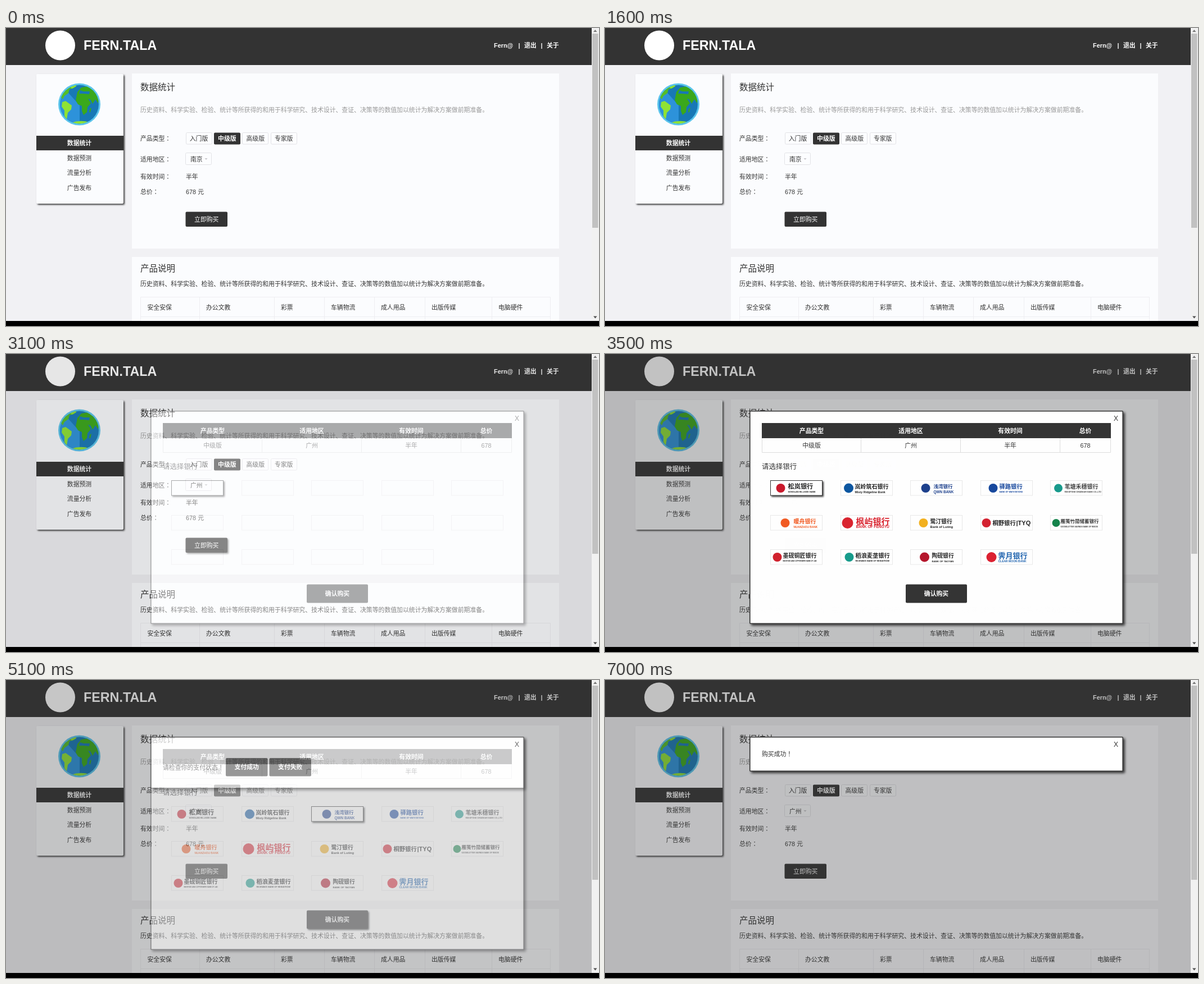
Recreate the animation shown at these times as an HTML page. Size 1055 by 531 pixels, loop 7.9 s.

```html
<!DOCTYPE html>
<html lang="zh-CN">
<head>
<meta charset="utf-8">
<title>数据统计</title>
<style>
html, body { margin: 0; width: 100%; height: 100%; overflow: hidden; background: #000; }
svg { display: block; }
text { font-family: "Liberation Sans", "Noto Sans CJK SC", "Noto Sans CJK", sans-serif; fill: #333; }
.centred { font-family: "Noto Sans CJK JP", "Noto Sans CJK", sans-serif; }
.mid { text-anchor: middle; }
.bold { font-weight: 700; }
.white { fill: #fff; }
.grey { fill: #999; }
.dark { fill: #333; }
.panel { fill: #fbfcfe; }
.line { fill: none; stroke: #eeeef2; }
.tag { fill: #fcfdff; stroke: #e2e2e6; }
.lift { filter: drop-shadow(2px 2px 1.5px rgba(0, 0, 0, .75)); }
.frame { fill: #fff; stroke: #333; stroke-width: 1.6; filter: drop-shadow(3px 3px 2px rgba(0, 0, 0, .7)); }
</style>
</head>
<body>
<svg id="stage" width="1055" height="531" viewBox="0 0 1055 531"></svg>
<script>
const BASE = 10.87;
const INTRO = '历史资料、科学实验、检验、统计等所获得的和用于科学研究、技术设计、查证、决策等的数值加以统计为解决方案做前期准备。';

// colons and exclamation marks sit in the middle of their cell
const punctuate = s => s.replace(/[：！]/g, '<tspan class="centred" lang="ja">$&</tspan>');
// y is the vertical centre of the text
const text = (s, x, y, cls = '', size = BASE, more = '') =>
  `<text x="${x}" y="${y + size * .37}" font-size="${size}" class="${cls}" ${more}>${punctuate(s)}</text>`;
const rect = (x, y, w, h, cls = '', more = '') =>
  `<rect x="${x}" y="${y}" width="${w}" height="${h}" class="${cls}" ${more}/>`;
const circle = (x, y, r, fill) => `<circle cx="${x}" cy="${y}" r="${r}" fill="${fill}"/>`;
const group = (id, body, more = '') => `<g id="${id}" ${more}>${body}</g>`;
const path = (d, fill) => `<path d="${d}" fill="${fill}"/>`;
const crisp = v => Math.floor(v) + .5;

const button = (label, x, y, w, h, cls = 'bold', id = '') =>
  rect(x, y, w, h, 'dark', `rx="2" id="${id}"`) + text(label, x + w / 2, y + h / 2, 'mid white ' + cls);

function globe() {
  return `<clipPath id="disc"><circle cx="130.5" cy="136" r="34.5"/></clipPath>` +
    circle(130.5, 136, 37.5, '#5cc5ec') + circle(130.5, 136, 34.5, '#1878b6') +
    `<g clip-path="url(#disc)">` +
    path('M94 110 L106 110 L131 138 V172 H94Z', '#2d92da') +
    path('M97 122 L101 110 L112 102 L126 100 L121 107 L113 109 L111 116 L104 121 L101 127Z', '#55bd27') +
    path('M113 103 L124 99 L125 104 L117 108Z', '#8fe235') +
    path('M100 132 L106 130 L117 138 L116 145 L110 151 L108 163 L104 157 L104 147 L99 140Z', '#8fe235') +
    path('M127 114 L134 106 L146 104 L158 110 L166 124 L164 134 L159 127 L154 135 L150 127 L146 126 L151 134 L145 141 L144 150 L138 155 L135 148 L135 139 L128 136 L124 129Z', '#3aa81b') +
    path('M132 111 L138 113 L149 113 L148 118 L138 117 L130 117Z', '#1878b6') +
    path('M149 144 L152 142 L150 150 L148 150Z', '#3aa81b') +
    path('M116 169 Q131 163 149 168 L143 172 H120Z', '#8fe235') + '</g>';
}

function header() {
  return rect(0, 0, 1042, 66, 'dark') + circle(96.5, 31, 26.5, '#fff') +
    text('FERN.TALA', 138, 30.5, 'bold white', 23.3) +
    text('Fern@', 868, 31, 'bold white') + text('|', 913, 31, 'mid bold white') +
    text('退出', 922, 31, 'bold white') + text('|', 953, 31, 'mid bold white') +
    text('关于', 962, 31, 'bold white');
}

function sidebar() {
  const items = ['数据统计', '数据预测', '流量分析', '广告发布'];
  return rect(54, 82, 155, 231, 'panel lift', 'rx="2"') + globe() + rect(54, 192, 155, 26, 'dark') +
    items.map((s, i) => text(s, 130.5, 205 + i * 26.5, i ? 'mid' : 'mid bold white')).join('');
}

function orderPanel() {
  const tags = ['入门版', '中级版', '高级版', '专家版'].map((s, i) => {
    const x = 320 + i * 50.4, on = i === 1;
    const box = on ? rect(x - .4, 186.5, 47, 21, 'dark', 'rx="2"') : rect(crisp(x), 186.5, 46, 20.5, 'tag', 'rx="2"');
    return box + text(s, x + 23, 197, on ? 'mid white bold' : 'mid');
  }).join('');
  const labels = [['产品类型：', 197], ['适用地区：', 233.5], ['有效时间：', 265], ['总价：', 291.5]];
  return rect(224, 81, 760, 312, 'panel') + text('数据统计', 239, 105, '', 15.54) +
    text(INTRO, 239, 145.5, 'grey') + labels.map(([s, y]) => text(s, 239, y)).join('') + tags +
    group('hover', rect(319.5, 186.5, 47, 21, 'dark', 'rx="2"') + text('入门版', 343, 197, 'mid white')) +
    rect(319.5, 222.5, 46, 21, 'tag', 'rx="2"') + text('南京', 328, 233.5, '', BASE, 'id="city"') +
    path('M353.5 232 h5 l-2.5 3z', '#c8c8cc') +
    text('半年', 320, 265) + text('678 元', 320, 291.5) + button('立即购买', 319.5, 327.5, 74.5, 26.5, '', 'buy');
}

function catalogue() {
  const cols = [239.5, 344, 477, 566, 655, 745, 864, 968.5];
  const rows = [
    '安全安保 办公文教 彩票 车辆物流 成人用品 出版传媒 电脑硬件',
    '电子电工 房地产建筑装修 分类平台 服装鞋帽 箱包饰品 化工原料制品 机械设备',
    '家庭日用品 家用电器 教育培训 节能环保 金融服务 礼品 旅游住宿',
    '美容化妆 母婴护理 农林牧渔 软件 商务服务 生活服务 食品保健品',
    '手机数码 通讯服务设备 网络服务 医疗服务 游戏 运动休闲娱乐 招商加盟'
  ];
  const grid = cols.map(x => `M${crisp(x)} 479.5v175`).join('') +
    [0, 1, 2, 3, 4, 5].map(i => `M239.5 ${479.5 + i * 35}h729`).join('');
  return rect(224, 408, 760, 258, 'panel') + text('产品说明', 239, 428, '', 15.54) + text(INTRO, 239, 456) +
    `<path class="line" d="${grid}"/>` +
    rows.map((row, r) => row.split(' ').map((s, c) => text(s, cols[c] + 12, 498 + r * 35)).join('')).join('');
}

function dropdown() {
  const cities = ['北京', '上海', '广州', '深圳', '南京'];
  return `<clipPath id="drop"><rect id="dropClip" x="315" y="242" width="76" height="0"/></clipPath>` +
    group('list', rect(319.5, 244.5, 67, 148, '', 'fill="#fff" stroke="#ddd" rx="2"') +
      rect(320, 303.5, 66, 29.6, 'dark', 'id="pick"') +
      cities.map((s, i) => text(s, 329, 259.5 + i * 29.6, '', BASE, `id="opt${i}"`)).join(''), 'clip-path="url(#drop)"');
}

const veil = rect(0, 0, 1042, 522, '', 'fill="#333" opacity=".3"');
const dialog = (id, h, body) =>
  group(id, veil + rect(257.8, 101.8, 663.4, h, 'frame', 'rx="1"') + text('X', 909, 115, 'mid', 12) + body);

// icon offset, radius, icon colour, name, name offset, size, text colour, latin line, latin size
const BANKS = [
  [18, 8, '#c9182b', '松岚银行', 31, 11.2, '#222', 'SONGLAN HILLSIDE BANK', 3.8],
  [14, 8.5, '#0a55a0', '岚岭筑石银行', 25, 10, '#222', 'Misty Ridgeline Bank', 5.4],
  [27, 8, '#1c3f8c', '浅湾银行', 41, 8.5, '#1c3f8c', 'QWN BANK', 6.4],
  [22, 8, '#16479d', '驿路银行', 33, 10.3, '#16479d', 'BANK OF WAYSTATIONS', 3.5],
  [14, 7.5, '#179a8c', '苇塘禾穗银行', 25, 10, '#444', 'REEDPOND GRAINEAR BANK CO.,LTD', 3.5],
  [26, 8, '#f15a22', '暖舟银行', 41, 10, '#f15a22', 'NUANZHOU BANK', 4.8],
  [12, 10, '#d9232e', '枫屿银行', 27, 15, '#d9232e', 'BANK OF FENGYU', 6.6],
  [23, 8, '#f2b01e', '鹭汀银行', 35, 9.8, '#222', 'Bank of Luting', 5.8],
  [10, 8, '#d3202f', '桐野银行', 21, 10.3, '#222', '', 0],
  [10, 7, '#14834a', '雁笺竹简储蓄银行', 18, 8.5, '#333', 'GOOSELETTER SAVINGS BANK OF REEDS', 3.2],
  [12, 8, '#d0202c', '墨砚铜匠银行', 22, 10, '#222', 'INKSTONE AND COPPERSMITH BANK OF LAN', 2.7],
  [15, 8, '#169b8b', '稻浪麦垄银行', 26, 10.2, '#222', 'RICEWAVE BANK OF WHEATROW', 3.7],
  [25, 8.5, '#b5152b', '陶砚银行', 38, 9.8, '#222', 'BANK OF TAOYAN', 4.4],
  [19, 9, '#dc2030', '霁月银行', 31, 13, '#1d62ae', 'CLEAR MOON BANK', 5]
];
const cellAt = i => [crisp(294.5 + (i % 5) * 124.5), crisp(225.5 + Math.floor(i / 5) * 61.5)];
const cell = (i, cls, more) => rect(...cellAt(i), 92, 26.5, cls, 'fill="#fff" ' + more);

function bankLogo([dx, r, mark, name, tx, size, ink, latin, small], i) {
  const [x, y] = cellAt(i);
  const fill = `style="fill:${ink}"`;
  return circle(x + dx, y + 13.5, r, mark) +
    text(name, x + tx, y + (latin ? 10.5 : 13.5), 'bold', size, fill) +
    (latin ? text(latin, x + tx, y + 20.5, 'bold', small, fill) : text('|TYQ', x + 63, y + 13.5, 'bold', 11, fill));
}

function bankDialog() {
  const cols = [279, 455.5, 632.5, 809.5, 899.5];
  const mids = [367.5, 544, 721, 854.5];
  const row = (list, y, cls) => list.map((s, i) => text(s, mids[i], y, 'mid ' + cls)).join('');
  return dialog('banks', 378.4,
    rect(279, 123, 621, 27, 'dark') + row(['产品类型', '适用地区', '有效时间', '总价'], 136.5, 'bold white') +
    `<path class="line" style="stroke:#ddd" d="M279.5 175.5h620${cols.map(x => `M${crisp(x)} 150v25.5`).join('')}"/>` +
    row(['中级版', '广州', '半年', '678'], 162.5, '') + text('请选择银行', 279, 200.5, '', 12.43) +
    BANKS.map((b, i) => cell(i, '', 'stroke="#e8e8e8"')).join('') +
    cell(0, 'lift', 'stroke="#333" id="first"') + cell(2, 'lift', 'stroke="#333" id="third"') +
    group('logos', BANKS.map(bankLogo).join('')) + button('确认购买', 535, 410.5, 109, 33, 'bold', 'confirm'));
}

const statusDialog = () => dialog('status', 91, text('请检查你的支付状态！', 279, 155.5) +
  button('支付成功', 391, 139, 74.5, 32.5, 'bold', 'paid') + button('支付失败', 468.5, 139, 74.5, 32.5));

const doneDialog = () => dialog('done', 60.4, text('购买成功！', 279, 132));

const scrollbar = () => rect(1042, 0, 13, 522, '', 'fill="#f1f1f1"') +
  rect(1043, 10, 10.5, 346, '', 'fill="#c1c1c1" id="thumb"') +
  path('M1045 7 h6.5 l-3.25 -4z', '#777') + path('M1045 513.5 h6.5 l-3.25 4z', '#505050');

document.getElementById('stage').innerHTML =
  `<clipPath id="view"><rect width="1042" height="522"/></clipPath><g clip-path="url(#view)">` +
  rect(0, 0, 1042, 522, '', 'fill="#f1f1f4"') +
  group('page', header() + sidebar() + orderPanel() + catalogue() + rect(0, 690, 1042, 62, 'dark') +
    text('Copyright @ 2017 WanderingTile ALL Rights Reserved', 518.5, 721, 'mid bold white') + dropdown()) +
  bankDialog() + statusDialog() + doneDialog() + '</g>' + scrollbar();

const el = {};
document.querySelectorAll('[id]').forEach(e => { if (e.id) el[e.id] = e; });

const clamp = v => Math.max(0, Math.min(1, v));
const swing = (t, start, length) => .5 - Math.cos(Math.PI * clamp((t - start) / length)) / 2;
const steps = (t, start, n) => clamp(((t - start) / 100 + 1) / n);
const show = (e, opacity) => {
  e.style.opacity = opacity;
  e.style.display = opacity > 0 ? '' : 'none';
};
const lift = (e, k) => {
  e.style.filter = k > 0 ? `drop-shadow(2px 2px 1.5px rgba(0,0,0,${.75 * k}))` : 'none';
};

function draw(t) {
  const scroll = Math.round(230 * (t < 800 ? steps(t, 300, 3) : 1 - steps(t, 800, 2)));
  el.page.setAttribute('transform', `translate(0 ${-scroll})`);
  el.thumb.setAttribute('y', 10 + scroll * 152 / 230);

  show(el.hover, t < 1600 ? steps(t, 1100, 3) : 0);
  const open = t >= 1800 && t < 2200;
  show(el.list, open ? 1 : 0);
  el.dropClip.setAttribute('height', 152 * steps(t, 1800, 2));
  show(el.pick, t >= 2000 ? 1 : 0);
  el.opt2.style.fill = t >= 2000 ? '#fff' : '';
  el.city.textContent = t < 2200 ? '南京' : '广州';
  lift(el.buy, t >= 2700 && t < 5000 ? .7 : 0);

  const paying = swing(t, 4700, 800), finished = swing(t, 6400, 600);
  show(el.banks, swing(t, 2750, 800) * (1 - paying));
  show(el.status, paying * (1 - finished));
  show(el.done, finished);

  show(el.logos, t >= 3200 ? 1 : 0);
  const move = steps(t, 3900, 2);
  show(el.first, 1 - move);
  show(el.third, move);
  lift(el.confirm, steps(t, 4300, 3));
  lift(el.paid, steps(t, 5700, 2));
}

const begin = performance.now();
function tick() {
  draw(Math.floor((performance.now() - begin) % 7900 / 100) * 100);
  requestAnimationFrame(tick);
}
tick();
</script>
</body>
</html>
```
